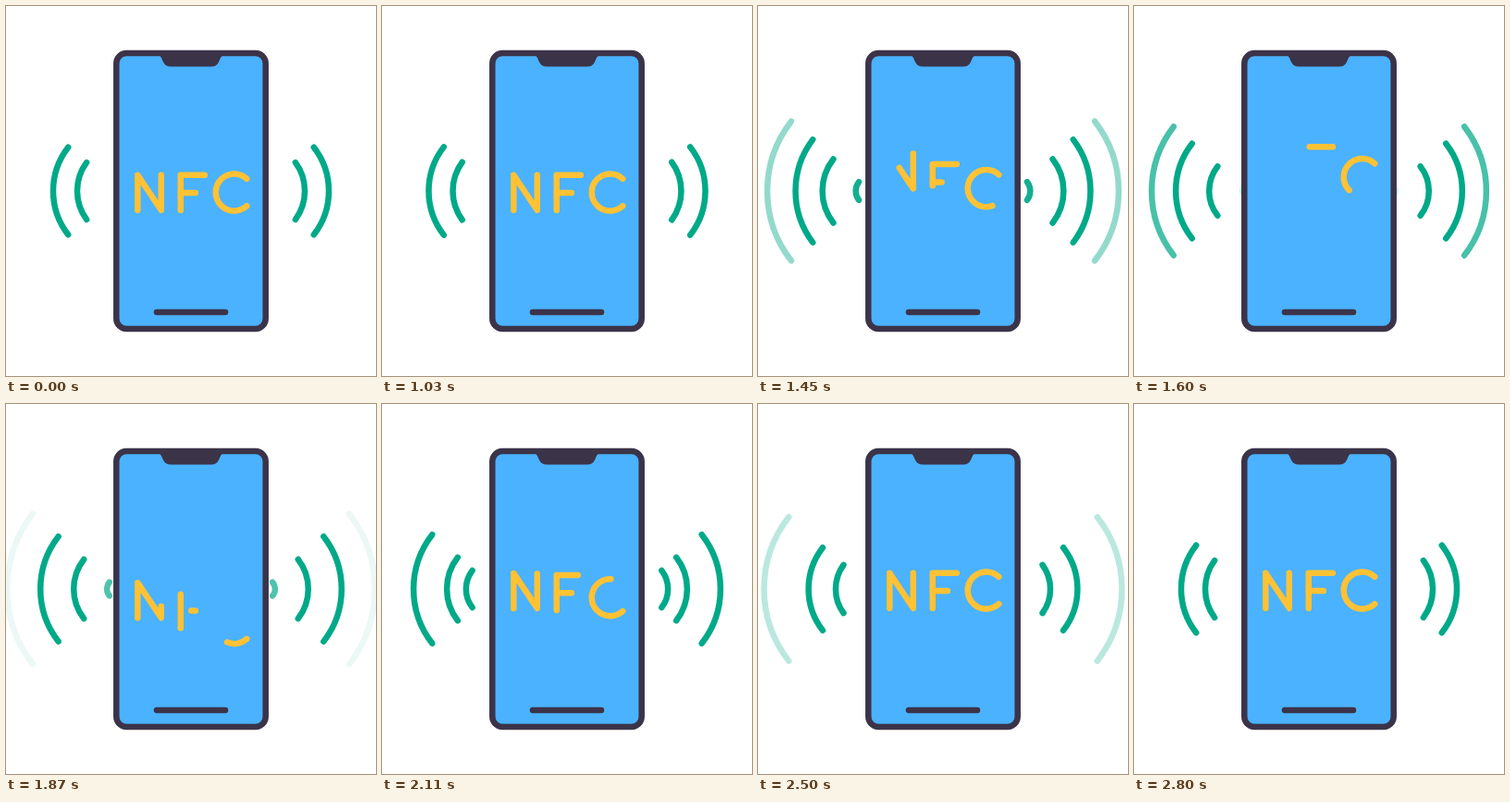
These frames come from a looping animation (400 px wide and 400 px high, 2.83 s). An HTML page:

```html
<!DOCTYPE html>
<html lang="en">
<head>
<meta charset="utf-8">
<title>NFC phone</title>
<style>
  html, body { margin: 0; width: 100%; height: 100%; overflow: hidden; background: #fff; }
  svg { display: block; width: 100vw; height: 100vh; }
  path, rect { stroke-width: 6.5; stroke-linecap: round; stroke-linejoin: round; }
  #waves { fill: none; stroke: #00a988; }
  #word { fill: none; stroke: #ffc234; }
</style>
</head>
<body>
<svg viewBox="0 0 400 400">
  <g id="waves"></g>
  <rect x="119.3" y="51" width="161.4" height="298" rx="11" fill="#4bb2ff" stroke="#3b3449"/>
  <path fill="#3b3449" d="M163 53C168 53 168 57 170 60.5C171.5 64 174 65.5 178 65.5H222C226 65.5 228.5 64 230 60.5C232 57 232 53 237 53Z"/>
  <path d="M163 331H237" stroke="#3b3449"/>
  <g id="word"></g>
</svg>
<script>
const LOOP = 2830, HOLD = 1030, STEP = 30;
const REACH = 121;      // distance at which a wave has faded out
const SPEED = 0.163;    // px per ms
const FADE_IN = 95, FADE_OUT = 170;

const clamp = x => Math.max(0, Math.min(1, x));

function addPath(parent, d) {
  const path = document.createElementNS('http://www.w3.org/2000/svg', 'path');
  if (d) path.setAttribute('d', d);
  parent.append(path);
  return path;
}

// Waves: each has a birth time, an end time and a distance over time.
const leaving = (from, end, inner) => ({
  birth: 0, end, inner,
  dist: t => from + (REACH - from) * clamp((t - 1000) / (end - 1000)) ** 1.61
});
const passing = birth => ({
  birth, end: birth + REACH / SPEED,
  dist: t => SPEED * (t - birth)
});
const settling = (to, birth, power, inner) => ({
  birth, end: Infinity, inner,
  dist: t => to * (1 - (1 - clamp((t - birth) / (2800 - birth))) ** power)
});

const waves = [
  leaving(69, 1522), leaving(43, 1722, true),
  ...[0, 1, 2, 3].map(i => passing(1141 + 221 * i)),
  settling(69, 1965, 2.88), settling(43, 2186, 2.54, true)
];
const waveGroup = document.getElementById('waves');
waves.forEach(w => w.path = addPath(waveGroup));

function arcs(d, inner) {
  const h = d * (inner ? 0.74 - 0.0005 * d : 0.685);
  const sag = 0.235 * d;
  const r = (h * h + sag * sag) / (2 * sag);
  const x = 120 - d + sag;
  return `M${x} ${200 - h}A${r} ${r} 0 0 0 ${x} ${200 + h}` +
    `M${400 - x} ${200 - h}A${r} ${r} 0 0 1 ${400 - x} ${200 + h}`;
}

function drawWave(w, t) {
  const d = w.dist(t);
  const shown = t > w.birth && t < w.end && d > 0.5;
  w.path.style.display = shown ? '' : 'none';
  if (!shown) return;
  w.path.setAttribute('d', arcs(d, w.inner));
  w.path.style.opacity = clamp((t - w.birth) / FADE_IN) * clamp((w.end - t) / FADE_OUT);
}

// Letters: stroke path, stagger order, share of the time before the stroke starts.
const strokes = [
  ['M142.3 220.7V182.7L167.8 220.7V182.7', 0, 0],
  ['M188.8 220.7V182.7H214.8', 1, 0],
  ['M204.8 202H188.8', 1, 0.4],
  ['M260.3 216.2A20 20 0 1 1 260.3 186.8', 2, 0]
];
const wordGroup = document.getElementById('word');
const letters = strokes.map(([d, order, wait]) => {
  const path = addPath(wordGroup, d);
  path.setAttribute('pathLength', 1);
  return { path, order, wait };
});

const OUT = 1030, IN = 1605, MOVE = 570, STAGGER = 102, SHIFT = 50;

function drawLetter({ path, order, wait }, t) {
  const delay = order * STAGGER;
  const gone = clamp((t - OUT - delay) / MOVE) ** 2.5;
  const back = 1 - (1 - clamp((t - IN - delay) / MOVE)) ** 2.5;
  const entering = t > IN + delay;
  const a = entering ? 0 : clamp(gone / (1 - wait));
  const b = entering ? clamp((back - wait) / (1 - wait)) : 1;
  const y = entering ? SHIFT * (1 - back) : -SHIFT * gone;
  path.style.display = b - a > 0.001 ? '' : 'none';
  path.setAttribute('transform', `translate(0 ${y})`);
  path.setAttribute('stroke-dasharray', b - a > 0.999 ? 'none' : `${b - a} 3`);
  path.setAttribute('stroke-dashoffset', -a);
}

function draw(ms) {
  const now = ms % LOOP;
  const t = now < HOLD ? LOOP : HOLD + Math.floor((now - HOLD) / STEP) * STEP;
  waves.forEach(w => drawWave(w, t));
  letters.forEach(l => drawLetter(l, t));
}

const start = performance.now();
function tick() {
  draw(performance.now() - start);
  requestAnimationFrame(tick);
}
tick();
</script>
</body>
</html>
```
